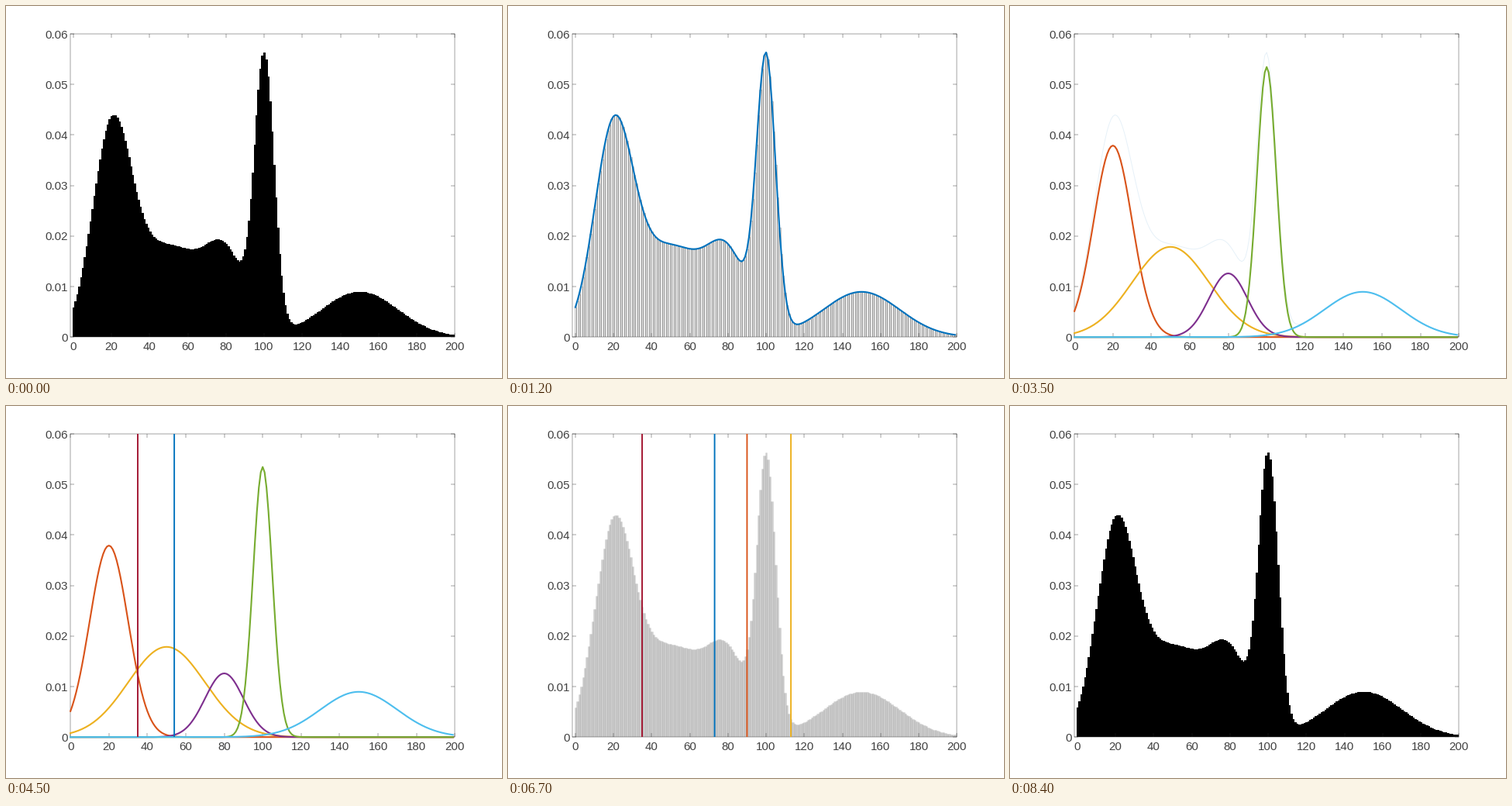
Animation of 640 by 480 pixels, one loop 9.2 s. Source, as a matplotlib script:

```python
import numpy as np
import matplotlib.pyplot as plt
from matplotlib.animation import FuncAnimation
from matplotlib.collections import PolyCollection
from matplotlib.ticker import FuncFormatter, MultipleLocator

W, H, DPI = 640, 480, 100
PX = 72 / DPI  # points per pixel
FRAMES, INTERVAL = 92, 100
INK = "#262626"
BLUE, ORANGE, YELLOW = "#0072BD", "#D95319", "#EDB120"
PURPLE, GREEN, CYAN, MAROON = "#7E2F8E", "#77AC30", "#4DBEEE", "#A2142F"
TOP = 0.06

# mean, deviation, weight, colour
COMPONENTS = [
    (20, 10, 0.95, ORANGE),
    (50, 20, 0.895, YELLOW),
    (80, 10, 0.316, PURPLE),
    (100, 5, 0.67, GREEN),
    (150, 20, 0.449, CYAN),
]
THRESHOLDS = [(35, MAROON), (73, BLUE), (90, ORANGE), (113, YELLOW)]

DENSITY_START, SWEEP_START, BARS_RETURN = 16, 37, 67

plt.rcParams["font.family"] = ["Liberation Sans"]


def gaussian(x, mean, dev, weight):
    return weight * np.exp(-((x - mean) / dev) ** 2 / 2) / (dev * np.sqrt(2 * np.pi))


def ramp(frame, start, end):
    return min(max((frame - start) / (end - start), 0), 1)


x = np.arange(200)
curves = [gaussian(x, m, d, w) for m, d, w, _ in COMPONENTS]
mixture = np.sum(curves, axis=0)

fig = plt.figure(figsize=(W / DPI, H / DPI), dpi=DPI, facecolor="white")
ax = fig.add_axes([0.13, 0.11, 0.775, 0.815])
ax.set_ylim(0, TOP)
ax.xaxis.set_major_locator(MultipleLocator(20))
ax.yaxis.set_major_locator(MultipleLocator(0.01))
for axis in (ax.xaxis, ax.yaxis):
    axis.set_major_formatter(FuncFormatter(lambda v, _: f"{round(v, 4):g}"))
ax.tick_params(direction="in", top=True, right=True, length=5 * PX,
               width=0.42 * PX, color=INK, labelcolor="#404040",
               labelsize=15 * PX)
ax.tick_params(axis="x", pad=5.8 * PX)
ax.tick_params(axis="y", pad=3.8 * PX)
for spine in ax.spines.values():
    spine.set(linewidth=0.42 * PX, color=INK)

bars = PolyCollection(
    [[(i - 0.5, 0), (i - 0.5, h), (i + 0.5, h), (i + 0.5, 0)]
     for i, h in zip(x, mixture)],
    linewidths=PX, zorder=1)
ax.add_collection(bars)


def curve(y, color, zorder):
    return ax.plot(x, y, color=color, lw=2.1 * PX, zorder=zorder, clip_on=False)[0]


def vertical(pos, color):
    return ax.plot([pos, pos], [0, TOP], color=color, lw=1.9 * PX, zorder=6,
                   solid_capstyle="butt", snap=False)[0]


mix_line = curve(mixture, BLUE, 3)
parts = [curve(y, c[3], 4) for y, c in zip(curves, COMPONENTS)]
marks = [vertical(*t) for t in THRESHOLDS]
sweep = vertical(0, BLUE)


def update(frame):
    density = DENSITY_START <= frame < BARS_RETURN
    ax.set_xlim(0 if density else -1.5, 200)

    # bars fade out at the start and back in at the end
    if frame < DENSITY_START:
        face, edge = max(0, 1 - frame / 13), 1 - frame / 15
    else:
        face = min(1, max(0, 0.2 * (frame - BARS_RETURN + 1)))
        edge = face ** 2
    bars.set_visible(not density)
    bars.set_facecolor((0, 0, 0, face))
    bars.set_edgecolor((0, 0, 0, edge))

    # the sum thins, then gives way to its components
    mix_line.set_visible(0 < frame < 36)
    mix_line.set_linewidth((2.1 - 1.1 * ramp(frame, 17, 24)) * PX)
    mix_line.set_alpha(1 - ramp(frame, 26, 36))
    for part in parts:
        part.set_visible(density and frame > 17)
        part.set_alpha(ramp(frame, 17, 24))

    # the sweep leaves a mark at every threshold it passes
    pos = 54 + 6.4 * (frame - 45)
    sweep.set_visible(SWEEP_START <= frame < BARS_RETURN)
    sweep.set_xdata([pos, pos])
    fade = 0 if frame >= 84 else 1 - min(max(frame - 77, 0), 5) / 6
    for mark, (threshold, _) in zip(marks, THRESHOLDS):
        mark.set_visible(pos >= threshold and fade > 0)
        mark.set_alpha(fade)
    return []


anim = FuncAnimation(fig, update, frames=FRAMES, interval=INTERVAL,
                     init_func=lambda: update(0), repeat=True, repeat_delay=0,
                     blit=False, cache_frame_data=False)
plt.show()
```
